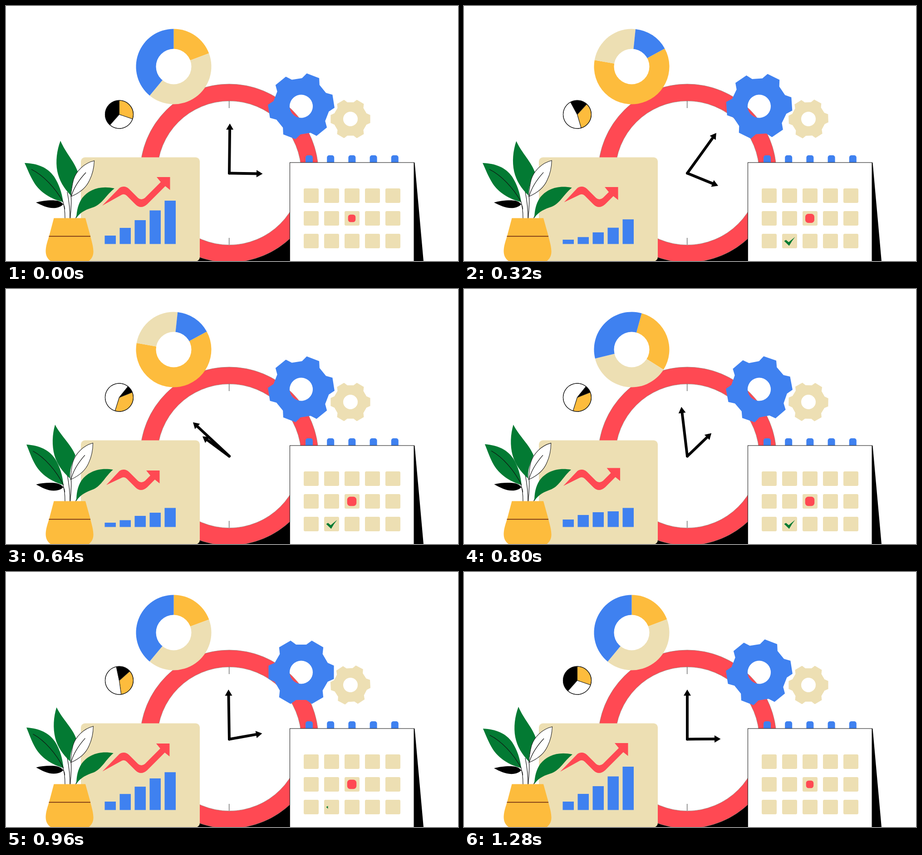
An HTML page for the animation above (1.36 s loop, 996 px wide and 562 px high).

```html
<!DOCTYPE html>
<html lang="en">
<head>
<meta charset="utf-8">
<title>Planning desk</title>
<style>
  html, body { margin: 0; width: 100%; height: 100%; overflow: hidden; background: #fff; }
  svg { display: block; width: 100vw; height: 100vh; }
  .blue { fill: #3f81f0; }
  .red { fill: #ff4953; }
  .sand { fill: #eddfb3; }
  .gold { fill: #fdbc3d; }
  .green { fill: #037a33; }
  .white { fill: #fff; }
  .line { fill: none; stroke: #111; stroke-width: 1.2; }
  .edge { stroke: #222; stroke-width: 1.1; }
  .soft { stroke: #8a8378; stroke-width: .7; }
</style>
</head>
<body>
<svg viewBox="0 0 996 562" preserveAspectRatio="none">
  <defs>
    <clipPath id="wipe"><rect id="wipeBox" y="500" height="36"/></clipPath>
  </defs>

  <rect x="420" y="505" width="210" height="57"/>
  <circle class="red soft" cx="492" cy="368.5" r="196.500"/>
  <circle class="white soft" cx="492" cy="368" r="158.700"/>
  <path d="M491.7 209v16M491.7 511v15" stroke="#555" stroke-width="1.2"/>
  <g transform="translate(492 368.5)">
    <g id="longHand"><path d="M0 0V-98" stroke="#000" stroke-width="6" stroke-linecap="round"/><path d="M-8-96L0-109.5 8-96z"/></g>
    <g id="shortHand"><path d="M0 0V-62" stroke="#000" stroke-width="6" stroke-linecap="round"/><path d="M-8-60L0-73.5 8-60z"/></g>
  </g>

  <rect class="sand" x="165" y="333.500" width="262" height="229" rx="9"/>
  <g id="bars" class="blue"></g>
  <path id="arrow" class="red"/>

  <g id="ring">
    <path class="gold"/><path class="sand"/><path class="blue"/>
    <circle class="white" cx="369.5" cy="133.5" r="39"/>
  </g>
  <g id="pie" class="edge" stroke-linejoin="round">
    <path class="gold"/><path class="white"/><path/>
  </g>
  <circle class="line" cx="249.5" cy="239" r="31"/>

  <g transform="translate(650.5 221)"><path id="bigGear" class="blue" fill-rule="evenodd"/></g>
  <g transform="translate(759 249)"><path id="smallGear" class="sand" fill-rule="evenodd"/></g>

  <path d="M899 345h1.500L920 562H899z"/>
  <g id="tabs" class="blue"></g>
  <rect class="white edge" x="625.5" y="345" width="273.500" height="230"/>
  <g id="days" class="sand"></g>
  <rect id="dot" class="red"/>
  <path class="green" clip-path="url(#wipe)" d="M705.500 518L709.500 515.500 715.500 520.500 729.500 509Q722 518 716.500 528.500z"/>

  <path class="line" d="M125 430C129 441 130 452 130 468M141.500 468C143 450 145 430 143 416M153.500 468L157 460M126 437Q129 440 129.500 448"/>
  <path class="line" d="M141 468C141 448 139 430 135 410"/>
  <path id="topLeaf" class="green" d="M120 297C112 318 109 342 113 364C117 384 127 401 143 418C143 400 150 385 159 368C152 344 132 325 120 297z"/>
  <g id="whiteLeaf">
    <path class="white edge" d="M194.500 341C172 346 155 364 149 382C145 396 144 408 143 420C160 413 176 402 184 384C191 370 194 356 194.500 341z"/>
    <path class="line" d="M176 367C162 382 150 398 144 419"/>
  </g>
  <g id="leftLeaf">
    <path class="green" d="M41 346C70 347 92 356 106 376C117 393 123 411 126 432C100 426 76 411 63 391C53 375 48 361 41 346z"/>
    <path class="line" d="M56 360C82 373 108 400 126 432"/>
  </g>
  <path id="rightLeaf" class="green" d="M239 402C208 395 183 404 168 423C159 436 156 450 155 467C165 453 178 448 194 443C212 436 221 416 239 402z"/>
  <path id="darkLeaf" d="M66 433C80 429 100 427 113 429Q122 431 126 437Q121 443 110 445C94 447 80 440 66 433z"/>
  <path class="gold" d="M105.500 467.500H175L186 507C189 520 192 528 192.500 540C193 551 188 558 182 562.500H99C92 558 87.500 551 87.500 540C88 528 91 520 95 507z"/>
  <path d="M94.500 507.500H186" stroke="#5c1a0c" stroke-width="1.500"/>
</svg>
<script>
const LOOP = 1360, STEP = 80, RAD = Math.PI / 180;
const KEYS = [0, 160, 320, 640, 800, 960, 1280, LOOP];
const $ = id => document.getElementById(id);
const set = (el, attrs) => { for (const k in attrs) el.setAttribute(k, attrs[k]); };
const mix = (a, b, p) => a + (b - a) * p;

function addRect(parent, x, y, width, height, rx = 0) {
  const el = document.createElementNS('http://www.w3.org/2000/svg', 'rect');
  set(el, { x, y, width, height, rx });
  parent.append(el);
  return el;
}

// Quick start, soft landing
function ease(ms) {
  const x = Math.min(1, Math.max(0, ms / 340));
  return x * x / (x * x + .235 * (1 - x) ** 2);
}
const away = (t, start, back) => ease(t - start) - ease(t - back);
const spin = (t, mid, width) => 360 / (1 + Math.exp((mid - t) / width));

// Monotone cubic through looping key values
function track(t, values) {
  const v = [...values, values[0]];
  const slope = i => (v[i + 1] - v[i]) / (KEYS[i + 1] - KEYS[i]);
  const tangent = i => {
    if (i === 0 || i === v.length - 1) return 0;
    const a = slope(i - 1), b = slope(i);
    return a * b > 0 ? 2 * a * b / (a + b) : 0;
  };
  let i = 0;
  while (t >= KEYS[i + 1]) i++;
  const h = KEYS[i + 1] - KEYS[i], x = (t - KEYS[i]) / h, y = 1 - x;
  return v[i] * y * y * (1 + 2 * x) + v[i + 1] * x * x * (3 - 2 * x)
    + h * x * y * (tangent(i) * y - tangent(i + 1) * x);
}

const polar = (r, deg) => [r * Math.sin(deg * RAD), -r * Math.cos(deg * RAD)];

function wedge(cx, cy, r, from, to) {
  const [x0, y0] = polar(r, from), [x1, y1] = polar(r, to);
  return `M${cx} ${cy}L${cx + x0} ${cy + y0}A${r} ${r} 0 ${+(to - from > 180)} 1 ${cx + x1} ${cy + y1}z`;
}

function slices(group, cx, cy, r, cuts) {
  const paths = group.querySelectorAll('path');
  cuts.forEach((a, i) => set(paths[i], { d: wedge(cx, cy, r, a, i < 2 ? cuts[i + 1] : cuts[0] + 360) }));
}

function gear(tip, root, hole) {
  const pts = [];
  for (let a = 30; a < 390; a += 60)
    pts.push(polar(root, a - 19.5), polar(tip, a - 11.5), polar(tip, a + 11.5), polar(root, a + 19.5));
  return `M${pts.join('L')}zM${-hole} 0a${hole} ${hole} 0 1 0 ${2 * hole} 0a${hole} ${hole} 0 1 0 ${-2 * hole} 0z`;
}

function arrowPath(p) {
  const d = 23 * p, at = (x, y) => `${x - d} ${y + d}`;
  return `M${212 + 9 * p} ${440 - 8 * p}L250 401Q261 394 271 403L291 423Q298 429 306 423`
    + `L${at(341, 388)} ${at(332, 377)} ${at(361.5, 377)} ${at(361.5, 405.5)} ${at(351, 397)}`
    + `L311 437Q297 449 285 437L266 418Q261 413 255 416z`;
}

const turn = (id, deg, x = 0, y = 0) => set($(id), { transform: `rotate(${deg} ${x} ${y})` });

const TALL = [506, 489, 472, 450.5, 429], LOW = [515, 509.5, 500, 493, 482.5];
const bars = TALL.map((y, i) => addRect($('bars'), 217.5 + 33 * i, y, 24.5, 524.5 - y));
for (let i = 0; i < 5; i++) {
  addRect($('tabs'), 660 + 47.2 * i, 329, 16, 22, 5);
  for (let j = 0; j < 3; j++) addRect($('days'), 656 + 45 * i, 402 + 50 * j, 33, 32, 3);
}
set($('bigGear'), { d: gear(73.5, 62, 25.5) });
set($('smallGear'), { d: gear(44.5, 37.5, 16) });

function draw(t) {
  const ring = away(t, 0, 645), pie = away(t, 190, 880);
  slices($('ring'), 369.5, 133.5, 83, [mix(0, 61.4, ring), mix(69.4, 280, ring), mix(219.6, 366, ring)]);
  slices($('pie'), 249.5, 239, 31, [mix(0, 68, pie), mix(108.7, 197.6, pie), mix(221.7, 399, pie)]);

  turn('longHand', spin(t, 492, 78));
  turn('shortHand', 90 + spin(t, 598, 102));
  turn('bigGear', track(t, [-8.9, -10.8, -4, -8.9, -10.8, 0, -8.9]));
  turn('smallGear', track(t, [0, 1, -2, 0, 1, -3, 0]));

  bars.forEach((bar, i) => {
    const y = mix(TALL[i], LOW[i], away(t, 40 * i, 640 + 40 * i));
    set(bar, { y, height: 524.5 - y });
  });
  set($('arrow'), { d: arrowPath(away(t, 87, 727)) });

  const sway = track(t, [0, .1, .4, 1, .95, .72, 0]);
  const lift = track(t, [0, -.25, 0, 1, 1.2, 1, .2]);
  turn('topLeaf', -4.8 * sway, 138, 440);
  turn('whiteLeaf', -1.7 * sway, 145, 440);
  turn('rightLeaf', -2.7 * sway, 156, 466);
  turn('leftLeaf', 2.2 * lift, 130, 450);
  turn('darkLeaf', 2.2 * lift, 128, 440);

  const size = track(t, [16.5, 17, 20, 20.5, 20.5, 20.5, 16.5]);
  set($('dot'), { x: 762 - size / 2, y: 468 - size / 2, width: size, height: size, rx: size * .33 });

  const left = mix(730, 704, ease((t - 40) * 1.25)), right = mix(730, 704, ease((t - 800) * 1.03));
  set($('wipeBox'), { x: left, width: Math.max(0, right - left) });
}

function tick() {
  draw(Math.floor(performance.now() % LOOP / STEP) * STEP);
  requestAnimationFrame(tick);
}
tick();
</script>
</body>
</html>
```
